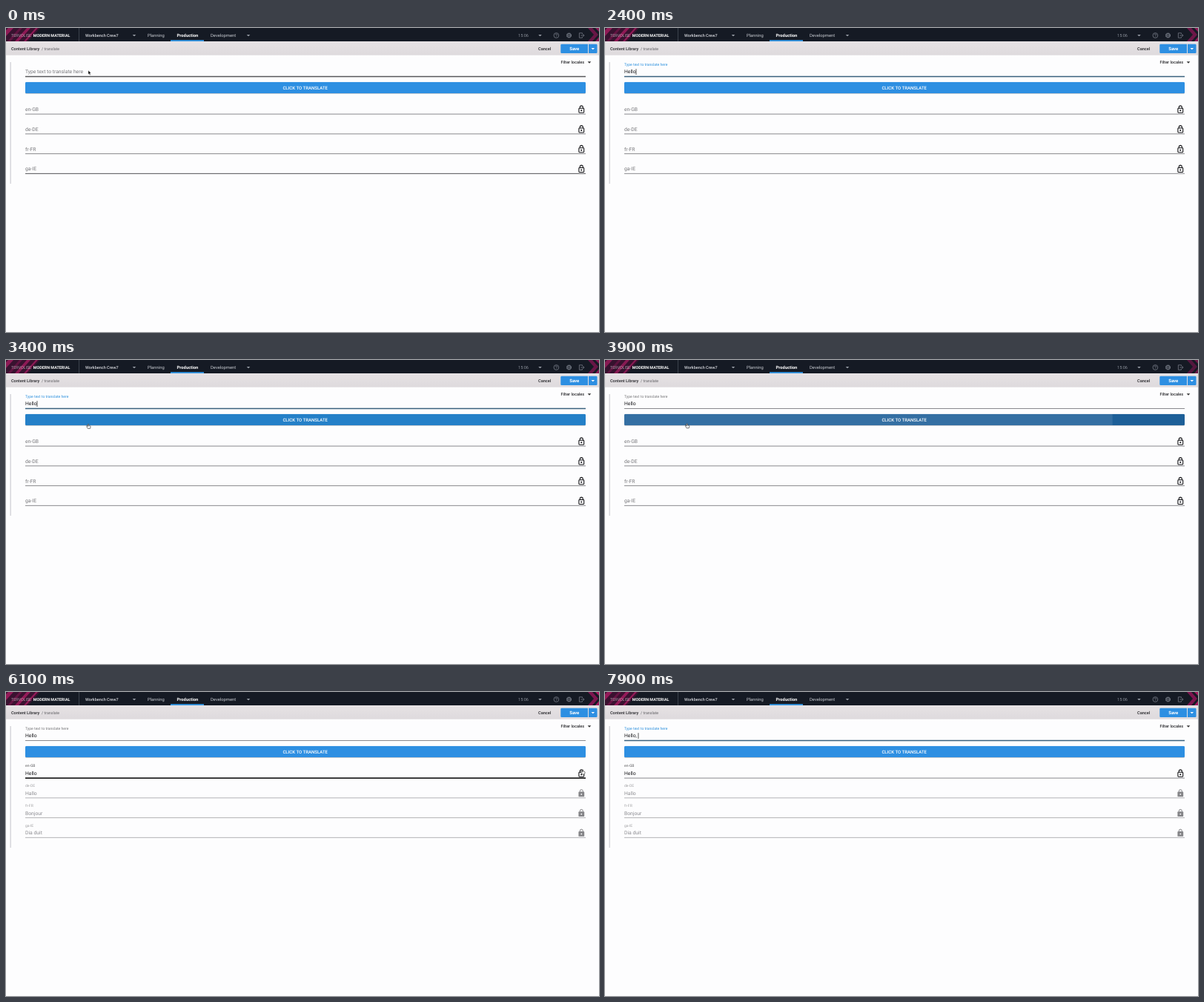
An HTML page that plays this animation: 800 by 410 pixels, repeating every 8000 ms.

```html
<!DOCTYPE html>
<html lang="en">
<head>
<meta charset="utf-8">
<title>Translate form</title>
<style>
  html, body { margin: 0; width: 100%; height: 100%; overflow: hidden; background: #fdfdfe; }
  svg { display: block; width: 800px; height: 410px; }
  text { font-family: Roboto, sans-serif; text-rendering: geometricPrecision; white-space: pre; }
  .nav { font-size: 5.85px; fill: #c9ccd2; }
  .med { font-weight: 500; }
  .bold { font-weight: 700; }
  .tool { fill: none; stroke: #767c87; stroke-width: .8; }
</style>
</head>
<body>
<svg viewBox="0 0 800 410">
  <defs>
    <linearGradient id="bar" x2="0" y2="1">
      <stop offset="0" stop-color="#e6e2e4"/><stop offset="1" stop-color="#dedadd"/>
    </linearGradient>
    <clipPath id="top"><rect width="800" height="18"/></clipPath>
    <clipPath id="face"><rect x="26" y="72.7" width="756" height="15.3" rx="1.5"/></clipPath>
    <path id="down" d="M-2.3-1.1h4.6L0 1.3z"/>
    <g id="open" fill="none" stroke-width="1.1">
      <rect x="-3.4" y="-1.4" width="6.8" height="5.9" rx=".6"/>
      <path d="M-2-1.5V-2.8a2 2 0 0 1 4 0V-1.5"/>
      <circle cy="1.6" r=".5"/>
    </g>
    <g id="shut" stroke="none">
      <rect x="-3.9" y="-1.9" width="7.8" height="6.8" rx=".9"/>
      <path d="M-2-1.5V-2.8a2 2 0 0 1 4 0V-1.5" fill="none" stroke="#858588" stroke-width="1"/>
      <circle cy="1.5" r=".9" fill="#fdfdfe"/>
    </g>
  </defs>

  <rect width="800" height="410" fill="#fdfdfe"/>
  <rect width="800" height="18" fill="#151a24"/>
  <g clip-path="url(#top)">
    <g id="stripes">
      <path d="M0 0H46L30 18H0z" fill="#3a1230"/>
      <path d="M0 3L3 0H10L0 11zM12 18L28 0H33L17 18zM24 18L40 0H43L27 18z" fill="#941a58"/>
      <path d="M2 18L18 0H22L6 18z" fill="#651443"/>
    </g>
    <g id="chevrons">
      <path d="M785 0H791L799 9L791 18H785L793 9z" fill="#7d164f"/>
      <path d="M795 0H800V5zM795 18L800 12V18z" fill="#a31b60"/>
    </g>
  </g>
  <path d="M98.5 0V18" stroke="#474d58" stroke-width=".8"/>
  <text x="7" y="12" font-size="5.4" font-weight="300" fill="#e2e3e7">TERVOLISE</text>
  <text x="36.8" y="12" font-size="5.4" class="bold" fill="#fff">MODERN MATERIAL</text>
  <text x="107" y="11.7" font-size="5.5" fill="#d5d7dc" class="med">Workbench Crew7</text>
  <text x="191" y="12" class="nav">Planning</text>
  <text x="230.5" y="12" class="nav bold" style="fill:#fff">Production</text>
  <text x="276" y="11.8" class="nav">Development</text>
  <rect x="222" y="16.2" width="45" height="1.8" fill="#3498e6"/>
  <text x="691" y="11.8" font-size="5.6" fill="#8b9099">15:06</text>
  <g fill="#9a9fa8">
    <use href="#down" x="173" y="10"/><use href="#down" x="327" y="10"/><use href="#down" x="720.5" y="10"/>
  </g>
  <g class="tool">
    <circle cx="742.4" cy="10" r="3.4"/>
    <path d="M741.2 9.2a1.2 1.1 0 1 1 1.8 .9q-.6 .3-.6 .9M742.4 11.7v.6"/>
    <circle cx="759.5" cy="10" r="2.9" stroke-width="1.1" stroke-dasharray="1.7 .58"/>
    <circle cx="759.5" cy="10" r="2.4"/><circle cx="759.5" cy="10" r=".9"/>
    <path d="M777.5 8V6.8H773.4V13.2H777.5V12M775.5 10H780M778.3 8.2L780.1 10L778.3 11.8"/>
  </g>

  <rect y="18" width="800" height="18.7" fill="url(#bar)"/>
  <text x="7" y="29.7" font-size="5.55" class="med" fill="#252529">Content Library</text>
  <text x="48" y="29.7" font-size="5.3" fill="#636367">/ translate</text>
  <text x="718" y="29.6" font-size="5.6" class="med" fill="#252529">Cancel</text>
  <path d="M749.5 21.7H785V34H749.5a1.2 1.2 0 0 1-1.2-1.2V22.9a1.2 1.2 0 0 1 1.2-1.2zM786 21.7h10.4a1.2 1.2 0 0 1 1.2 1.2v9.9a1.2 1.2 0 0 1-1.2 1.2H786z" fill="#2d8fe2"/>
  <text x="766.8" y="29.8" font-size="6" class="bold" fill="#fff" text-anchor="middle">Save</text>
  <use href="#down" x="791.8" y="28" fill="#fff"/>

  <text x="748.4" y="48.2" font-size="5.55" class="med" fill="#2b2b2e">Filter locales</text>
  <use href="#down" x="787" y="46.4" fill="#333"/>
  <path d="M6.2 46V210" stroke="#d9d9de" stroke-width="1.6"/>

  <rect x="26" y="73.5" width="756" height="15.3" rx="1.5" fill="#b5b9c0"/>
  <g clip-path="url(#face)">
    <rect id="button" x="26" y="72.7" width="756" height="15.3"/>
    <circle id="ripple" cx="111" cy="85" fill="#fff"/>
  </g>
  <text x="403.7" y="82.6" font-size="6.06" class="med" fill="#fff" text-anchor="middle">CLICK TO TRANSLATE</text>

  <g id="form"></g>
  <path id="caret" stroke="#111" stroke-width=".7"/>
  <g id="pointer" stroke-linejoin="round">
    <path id="arrow" d="M0 0V5.2L1.2 4.1L2.1 6.1L3 5.7L2.1 3.8H3.7z" fill="#000" stroke="#fff" stroke-width=".35"/>
    <path id="hand" d="M-.6 .5q.6-1 1.2 0V2.5L2.6 3Q3.3 3.2 3.1 4L2.5 6.4H-.7L-2.2 3.9Q-2-.1-.6 3.8z" fill="#fff" stroke="#222" stroke-width=".6"/>
  </g>
</svg>

<script>
const LOOP = 8000, STEP = 100, SIZE = 6.77;
const $ = id => document.getElementById(id);
const clamp = v => Math.max(0, Math.min(1, v));
const between = (t, a, b) => t >= a && t < b;
const show = (el, on) => el.setAttribute('visibility', on ? 'visible' : 'hidden');

function make(tag, attrs) {
  const el = document.createElementNS('http://www.w3.org/2000/svg', tag);
  set(el, attrs);
  $('form').append(el);
  return el;
}
function set(el, attrs) {
  for (const k in attrs) el.setAttribute(k, attrs[k]);
}

// Linear interpolation over [time, ...values] keys.
function at(keys, t) {
  const i = keys.findIndex(k => k[0] > t);
  if (i < 0) return keys[keys.length - 1].slice(1);
  if (!i) return keys[0].slice(1);
  const a = keys[i - 1], b = keys[i], p = (t - a[0]) / (b[0] - a[0]);
  return a.slice(1).map((v, j) => v + (b[j + 1] - v) * p);
}

const pathKeys = [
  [0, 111, 57.3], [400, 112, 58], [2800, 116, 62], [3100, 113, 93], [3400, 111, 86], [4300, 110.5, 85],
  [4500, 160, 98], [4700, 269, 109.7], [5400, 762, 110], [5600, 779, 114], [5800, 778, 105],
  [6100, 778, 104.5], [6300, 640, 103], [6700, 160, 68], [6800, 118, 58]
];
const glowKeys = [[0, .8], [2400, .85], [3400, .8], [4700, .3], [5400, .6], [6100, 1]];
const typing = [[1600, 'H'], [1800, 'He'], [2000, 'Hel'], [2200, 'Hell'], [2400, 'Hello'],
                [7800, 'Hello,'], [7900, 'Hello, ']];
const caretStarts = [100, 6900, ...typing.map(k => k[0])].sort((a, b) => a - b);

function makeField(name, y) {
  return {
    y,
    line: make('path', { d: `M26 ${y + 6.5}H782` }),
    label: make('text', { x: 26 }),
    value: make('text', { x: 26, y: y + 2.4, 'font-size': SIZE }),
    name
  };
}
function drawField(f, { float, value, label, ink, line, weight }) {
  f.label.textContent = f.name;
  set(f.label, { y: f.y + 2.4 - 10.6 * float, 'font-size': SIZE * (1 - .25 * float), fill: label });
  f.value.textContent = value;
  set(f.value, { fill: ink });
  set(f.line, { stroke: line, 'stroke-width': weight });
}

const input = makeField('Type text to translate here', 59);
const rows = [['en-GB', 'Hello'], ['de-DE', 'Hallo'], ['fr-FR', 'Bonjour'], ['ga-IE', 'Dia duit']]
  .map(([name, word], i) => {
    const row = makeField(name, 109.6 + 26.75 * i);
    row.word = word;
    row.lock = make('use', { x: 776.3, y: row.y + .1 });
    return row;
  });

function drawInput(t, over) {
  const focus = between(t, 100, 3700) || t >= 6900;
  const typed = typing.filter(k => k[0] <= t).pop();
  drawField(input, {
    float: clamp((t - 100) / 200),
    value: typed ? typed[1] : '',
    label: focus ? '#2a8fdd' : '#757578',
    ink: '#18181b',
    line: focus ? '#3a617d' : over ? '#57575a' : '#89898d',
    weight: focus || over ? 1.3 : 1
  });
  const last = caretStarts.filter(s => s <= t).pop();
  const x = 26.4 + (typed ? input.value.getComputedTextLength() : 0);
  $('caret').setAttribute('d', `M${x} 55.2V63`);
  show($('caret'), focus && Math.floor((t - last) / 500) % 2 === 0);
}

function drawRows(t) {
  const filled = t >= 4300;
  rows.forEach((row, i) => {
    const locked = filled && !(i === 0 && t >= 6000);
    const hover = i === 0 && between(t, 6000, 6400);
    const fresh = i === 3 && t < 400;
    drawField(row, {
      float: clamp((t - 4300) / 200),
      value: filled ? row.word : '',
      label: locked ? '#a3a3a6' : filled ? '#606063' : '#77777a',
      ink: locked ? '#8c8c90' : '#18181b',
      line: hover ? '#222' : fresh ? '#515154' : locked ? '#b3b3b6' : '#89898d',
      weight: hover ? 1.6 : 1
    });
    set(row.lock, {
      href: locked ? '#shut' : '#open',
      fill: locked ? '#858588' : 'none',
      stroke: '#151518'
    });
  });
}

function drawButton(t, over) {
  const pressed = between(t, 3700, 4300);
  const p = clamp((t - 3700) / 323);
  set($('button'), { fill: pressed ? '#1d5f98' : over ? '#2480c8' : '#2d8fe2' });
  set($('ripple'), {
    r: 671 * (1 - (1 - p) ** 2),
    opacity: pressed ? .1 * clamp((4300 - t) / 300) : 0
  });
}

function draw(t) {
  const [x, y] = at(pathKeys, t);
  const seen = t < 400 || between(t, 2800, 7100);
  const onButton = seen && y > 72.5 && y < 88 && x > 26 && x < 782;
  const hand = onButton || (x > 771 && y < 115);
  drawInput(t, seen && y < 67);
  drawRows(t);
  drawButton(t, onButton);
  set($('pointer'), { transform: `translate(${x} ${y})` });
  show($('arrow'), seen && !hand);
  show($('hand'), seen && hand);
  const [glow] = at(glowKeys, t);
  set($('chevrons'), { opacity: glow });
  set($('stripes'), { opacity: .75 + .25 * glow });
}

const start = performance.now();
function tick() {
  const t = (performance.now() - start) % LOOP;
  draw(Math.floor(t / STEP) * STEP);
  requestAnimationFrame(tick);
}
tick();
</script>
</body>
</html>
```
